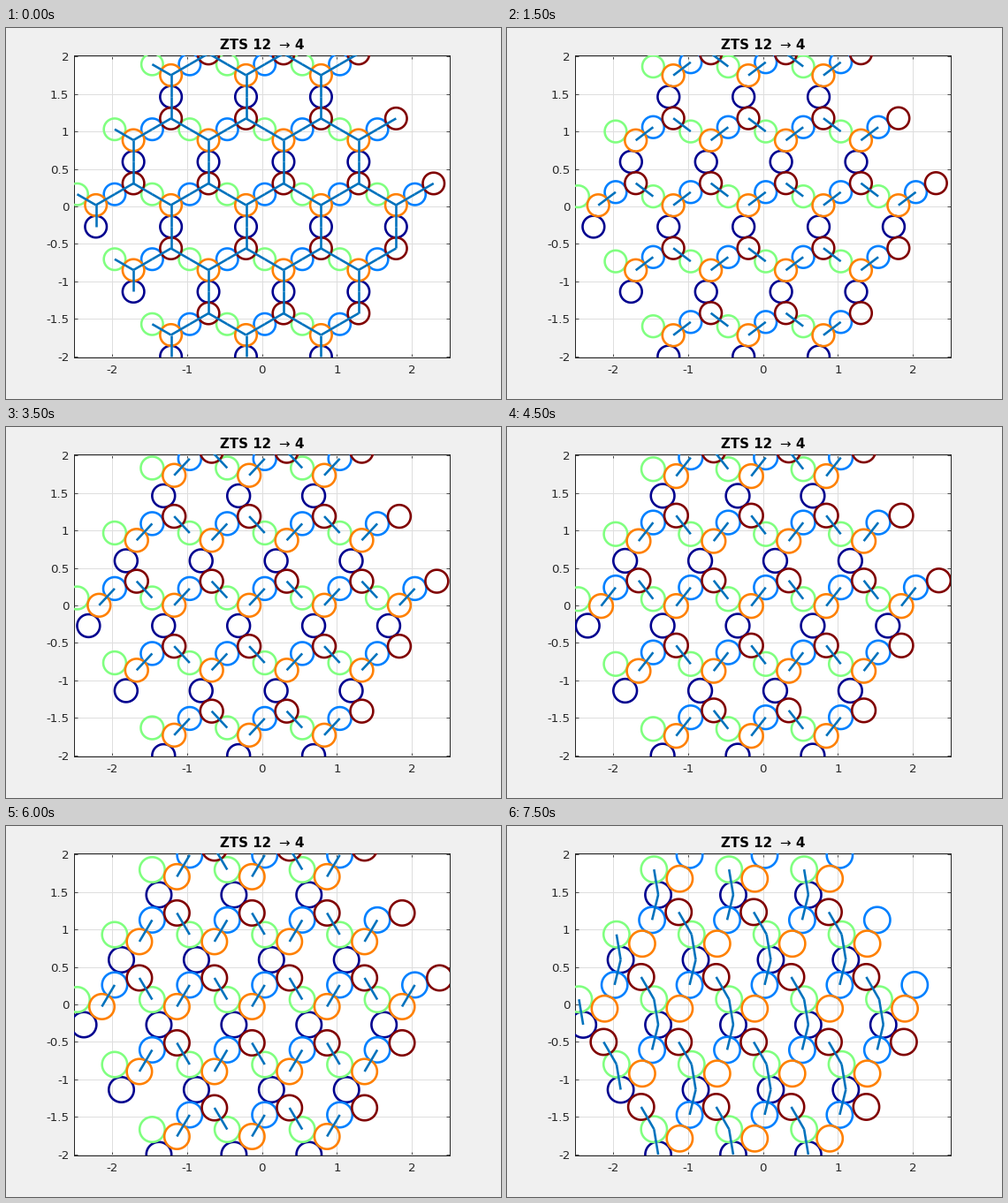
These frames come from a looping animation (560 by 420 pixels, 8 s). A matplotlib script:

```python
import numpy as np
import matplotlib.pyplot as plt
from matplotlib.animation import FuncAnimation
from matplotlib.collections import LineCollection, PolyCollection

W, H, DPI = 560, 420, 100
PX = 72 / DPI                      # points per pixel
FRAMES, STEP = 16, 500
BUCKLED, REBOUND = 1, 13           # frames at which the contact network changes

# Plot box in pixels: centre, half size and pixels per data unit
CX, CY, HALF_W, HALF_H, UNIT = 289.55, 202, 212.25, 171, 84.9

plt.rcParams["font.family"] = "DejaVu Sans"
INK = "#262626"
COLORS = dict(navy="#00008f", blue="#0080ff", green="#80ff80",
              orange="#ff8000", red="#800000")

# Hexagonal patch of 19 unit cells
A1, A2 = np.array([1, 0]), np.array([0.5, np.sqrt(3) / 2])
ORIGIN = np.array([-0.2125, 0.1625])
CELLS = [(m, n) for n in range(-2, 3) for m in range(-2, 3) if abs(m + n) <= 2]

# Contacts: first disk, second disk, cell offset of the second
FULL = [("orange", "blue", (0, 0)), ("blue", "red", (0, 0)),
        ("green", "orange", (0, 0)), ("orange", "navy", (0, 0)),
        ("red", "green", (1, 0)), ("red", "navy", (0, 1))]
PAIRS = [FULL[0], FULL[4]]
CHAIN = [("red", "green", (1, -1)), ("green", "navy", (0, 0)),
         ("navy", "blue", (0, -1))]

# Drift of each disk after the rebound, in pixels over three frames
DRIFT = dict(navy=(-1.9, 0), blue=(-1.25, 0), green=(0.95, 0.3),
             orange=(2.0, -2.3), red=(0.85, 1.05))


def buckle(k):
    """Disk offsets within a cell and disk radius after k steps of twist."""
    theta = np.radians(30 + 2.5 * k)
    delta = np.radians(k * (2.465 - 0.0485 * k))
    s = theta - delta
    bond = 0.25 / (np.cos(s) * np.cos(delta))
    dx = 0.25 - bond * np.cos(theta)
    lift, rise = 0.235 * np.tan(delta), 0.25 * np.tan(s)
    mid = np.sqrt(3) / 4
    side = np.sqrt(max(0, bond**2 - (mid - rise) ** 2))
    disks = dict(navy=(dx - side, -mid), blue=(0.25, lift), green=(-0.25, -lift),
                 orange=(dx, -rise), red=(0.5 + dx, rise))
    return {c: np.array(p) for c, p in disks.items()}, np.hypot(0.25 - dx, rise + lift) / 2


def state(k):
    disks, r = buckle(min(k, REBOUND - 1))
    if k < BUCKLED:
        return disks, r, FULL
    if k < REBOUND:
        return disks, r, PAIRS
    u = (k - REBOUND + 1) / 3
    for c, d in DRIFT.items():
        disks[c] = disks[c] + u * np.array(d) / UNIT
    disks["red"] = disks["red"] - A2
    return disks, r + 0.005 * u, CHAIN


def place(cell, offset):
    return ORIGIN + cell[0] * A1 + cell[1] * A2 + offset


fig = plt.figure(figsize=(W / DPI, H / DPI), dpi=DPI, facecolor="#f0f0f0")
ax = fig.add_axes([(CX - HALF_W) / W, 1 - (CY + HALF_H) / H, 2 * HALF_W / W, 2 * HALF_H / H])
ax.set(xlim=(-HALF_W / UNIT, HALF_W / UNIT), ylim=(-HALF_H / UNIT, HALF_H / UNIT))
yticks = np.arange(-2, 2.5, 0.5)
ax.set_xticks(range(-2, 3), [str(x) for x in range(-2, 3)])
ax.set_yticks(yticks, [f"{y:g}" for y in yticks])
ax.tick_params(direction="in", top=True, right=True, length=4.25 * PX, width=0.8 * PX,
               color=INK, labelcolor=INK, labelsize=13.33 * PX)
ax.tick_params(axis="x", pad=8 * PX)
ax.tick_params(axis="y", pad=6 * PX)
ax.grid(color="#dedede", linewidth=1 * PX)
ax.set_axisbelow(True)
for spine in ax.spines.values():
    spine.set(color=INK, linewidth=1 * PX)
for x, text, weight in [(242.5, "ZTS 12", "bold"), (308.5, "→", "normal"), (326.5, "4", "bold")]:
    fig.text(x / W, 1 - 24 / H, text, size=15 * PX, weight=weight,
             ha="left", va="baseline", color="black")

STROKE = 2.6 * PX
rings = {c: PolyCollection([], facecolors="none", edgecolors=col, linewidths=STROKE, zorder=3)
         for c, col in COLORS.items()}
bonds = LineCollection([], colors="#0072bd", linewidths=STROKE, zorder=4)
for art in [*rings.values(), bonds]:
    ax.add_collection(art, autolim=False)

turn = np.linspace(0, 2 * np.pi, 73)[:-1]
CIRCLE = np.column_stack([np.cos(turn), np.sin(turn)])


def draw(k):
    disks, r, contacts = state(k)
    for c, ring in rings.items():
        ring.set_verts([place(cell, disks[c]) + r * CIRCLE for cell in CELLS])
    segments = []
    for m, n in CELLS:
        for a, b, (i, j) in contacts:
            other = (m + i, n + j)
            if other in CELLS:
                segments.append([place((m, n), disks[a]), place(other, disks[b])])
    bonds.set_segments(segments)
    return [*rings.values(), bonds]


anim = FuncAnimation(fig, draw, frames=FRAMES, interval=STEP, repeat=True, repeat_delay=0)
plt.show()
```
